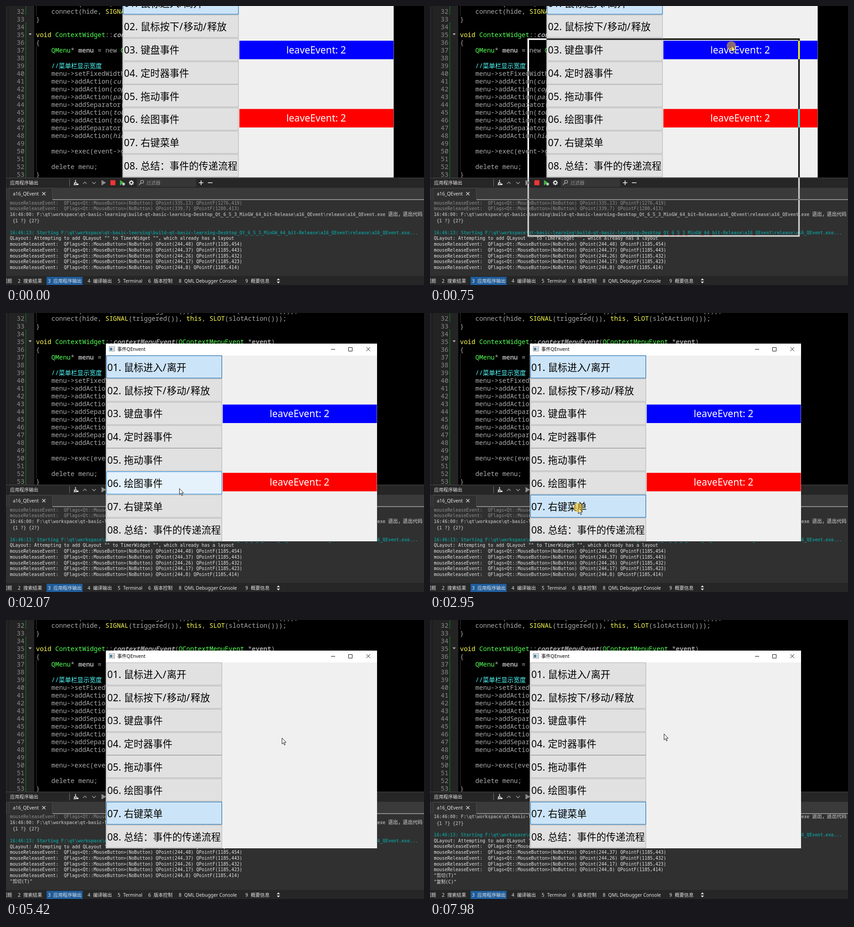
These frames come from a looping animation (917 px wide and 611 px high, 8 s). An HTML page:

```html
<!DOCTYPE html>
<html lang="zh">
<head>
<meta charset="utf-8">
<title>QEvent</title>
<style>
html, body { margin: 0; width: 100%; height: 100%; overflow: hidden; background: #000; }
svg { display: block; width: 917px; height: 611px; isolation: isolate; }
text { white-space: pre; font: 10.3px "Noto Sans", "Noto Sans CJK SC", sans-serif; }
.code text { font: 14.1px "Noto Sans Mono", "Noto Sans CJK SC", monospace; fill: #aaa; }
.code .num { fill: #888; text-anchor: end; }
.k { fill: #ff5; } .t { fill: #5f5; } .c { fill: #5ff; font-size: 13.5px; }
.b { font-weight: bold; } .i { font-style: italic; }
.log text { font: 9.86px "DejaVu Sans Mono", "Noto Sans CJK SC", monospace; fill: #e4e4e4; }
.log .old { fill: #8e8e8e; }
.log .gone { fill: #a2a2a2; font-weight: bold; }
.log .start { fill: #128c8c; font-weight: bold; }
.big { font-size: 21.25px; }
.bar text { fill: #e6e6e6; }
#outline { mix-blend-mode: difference; }
</style>
</head>
<body>
<svg id="stage" viewBox="0 0 917 611" xmlns="http://www.w3.org/2000/svg"></svg>
<script>
const rect = (x, y, w, h, fill, more = '') =>
  `<rect x="${x}" y="${y}" width="${w}" height="${h}" fill="${fill}" ${more}/>`;
const text = (x, y, s, more = '') => `<text x="${x}" y="${y}" ${more}>${s}</text>`;
const line = (d, color, w = 1, more = '') =>
  `<path d="${d}" fill="none" stroke="${color}" stroke-width="${w}" ${more}/>`;
const shape = (d, fill) => `<path d="${d}" fill="${fill}"/>`;
const span = cls => s => `<tspan class="${cls}">${s}</tspan>`;
const key = span('k'), type = span('t'), bold = span('b'), ital = span('i');

// Editor
const connect = name => `connect(${name}, ${key('SIGNAL')}(triggered()), ${key('this')}, ${key('SLOT')}(slotAction()));`;
const add = name => `menu-&gt;addAction(${ital(name)});`;
const codeLines = [
  [31, 4, connect('toLower')],
  [32, 4, connect('hide')],
  [33, 0, '}'],
  [35, 0, `${key('void')} ${type('ContextWidget')}::${span('b i')('contextMenuEvent')}(${type('QContextMenuEvent')} *${bold('event')})`],
  [36, 0, '{'],
  [37, 4, `${type('QMenu')}* ${bold('menu')} = new ${type('QMenu')}(${key('this')});`],
  [39, 4, span('c')('//菜单栏显示宽度')],
  [40, 4, 'menu-&gt;setFixedWidth(160);'],
  [41, 4, add('cut')],
  [42, 4, add('copy')],
  [43, 4, add('paste')],
  [44, 4, 'menu-&gt;addSeparator();'],
  [45, 4, add('toUpper')],
  [46, 4, add('toLower')],
  [47, 4, 'menu-&gt;addSeparator();'],
  [48, 4, add('hide')],
  [50, 4, 'menu-&gt;exec(event-&gt;globalPos());'],
  [52, 4, 'delete menu;'],
  [53, 0, '}']
];
const lineY = n => 17 + (n - 32) * 17;

function editor() {
  let s = rect(0, 0, 917, 377, '#000') + rect(0, 0, 62, 377, '#232323') + rect(0, 0, 4, 377, '#262626')
    + rect(4, 0, 1, 377, '#111') + rect(43, 0, 1, 20, '#0a8a1c') + rect(43, 36, 1, 340, '#0a8a1c')
    + rect(66, 0, 1, 21, '#3c3c3c') + rect(66, 88, 1, 274, '#3c3c3c')
    + shape('M49.5 60h7l-3.5 4z', '#b4b4b4');
  for (let n = 32; n <= 53; n++) s += text(40.5, lineY(n), n, 'class="num"');
  for (const [n, col, src] of codeLines) s += text(65.7 + col * 8.46, lineY(n), src);
  return `<g class="code">${s}</g>`;
}

// Output pane
const point = (p, q) => `mouseReleaseEvent:  QFlags&lt;Qt::MouseButton&gt;(NoButton) QPoint(${p}) QPointF(${q})`;
const exe = 'F:\\qt\\workspace\\qt-basic-learning\\build-qt-basic-learning-Desktop_Qt_6_5_3_MinGW_64_bit-Release\\a16_QEvent\\release\\a16_QEvent.exe';
const logLines = [
  ['old', point('335,13', '1276,419')],
  ['old', point('339,7', '1280,413')],
  ['gone', `16:46:00: ${exe} <tspan font-size="10.8">退出，退出代码</tspan>`, 1.5],
  ['gone', ' {1 ?} {2?}'],
  ['', ''],
  ['start', `16:46:13: Starting ${exe}...`],
  ['', 'QLayout: Attempting to add QLayout "" to TimerWidget "", which already has a layout'],
  ['', point('244,48', '1185,454')],
  ['', point('244,37', '1185,443')],
  ['', point('244,26', '1185,432')],
  ['', point('244,17', '1185,423')],
  ['', point('244,8', '1185,414')],
  ['cut', '"剪切(T)"', 1.5],
  ['copy', '"复制(C)"']
];

function log() {
  let y = 434.6, s = '';
  for (const [cls, src, extra = 0] of logLines) {
    s += text(8.5, y.toFixed(1), src, `class="${cls}"`);
    y += 12.72 + extra;
  }
  return `<g class="log" clip-path="url(#logClip)"><g id="log">${s}</g></g>`;
}

function pane() {
  const gear = Array.from({ length: 8 }, (_, i) =>
    `<rect x="274" y="381.5" width="2" height="3" fill="#e6e6e6" transform="rotate(${i * 45} 275 387)"/>`).join('');
  const tools = text(9, 390.8, '应用程序输出') + rect(139, 379, 1, 16, '#777')
    + line('M152.5 381v6M149 387.5h7M148 391.5h5l-4-4', '#e6e6e6', 1.6) + rect(154, 389, 5, 3, '#e6e6e6')
    + line('M169 389.5l4-4l4 4M189 385.5l4 4l4-4', '#9a9a9a', 1.3)
    + shape('M209.5 381v12l10-6z', '#8e8e8e') + rect(229, 381.5, 11, 11, '#f03434')
    + shape('M250 381v12l9-6z', '#3fb53f') + '<circle cx="258" cy="390" r="3" fill="#b9c4cc"/>'
    + gear + '<circle cx="275" cy="387" r="3" fill="none" stroke="#e6e6e6" stroke-width="1.8"/>'
    + rect(287, 378, 130, 18, '#363636')
    + '<circle cx="298.5" cy="385" r="3.2" fill="none" stroke="#b4b4b4" stroke-width="1.3"/>'
    + line('M296 387.5l-4 4', '#b4b4b4', 1.6) + text(308, 390.8, '过滤器', 'style="fill:#8f8f8f"')
    + line('M423 387h10M428 382v10M443 387h10', '#f2f2f2', 1.6);
  const tabs = [[26, 2, '搜索结果'], [92, 3, '应用程序输出'], [179, 4, '编译输出'], [245, 5, 'Terminal'],
    [312, 6, '版本控制'], [379, 8, 'QML Debugger Console'], [525, 9, '概要信息']];
  return `<g class="bar">` + rect(0, 376, 917, 235, '#303030') + rect(0, 376, 917, 1, '#4a4a4a')
    + rect(0, 377, 917, 21, '#262626') + rect(0, 398, 917, 26, '#3a3a3a')
    + rect(6, 399, 96, 26, '#303030') + line('M6.5 424v-25h95v25', '#4a4a4a')
    + rect(102, 423.5, 815, 1, '#e0e0e0') + rect(4, 377, 1, 47, '#161616')
    + tools + text(15, 414.8, 'a16_QEvent') + line('M79.5 407.5l7 7m0-7l-7 7', '#e6e6e6', 1.2)
    + rect(0, 591, 917, 20, '#262626') + rect(89, 593, 79, 18, '#1f5c9a')
    + text(-7.3, 606, '问题')
    + tabs.map(([x, n, s]) => text(x, 606, n) + text(x + 12, 606, s)).join('')
    + shape('M594 600.5h7l-3.5-4zM594 603.5h7l-3.5 4z', '#e6e6e6') + '</g>' + log();
}

// Application window
const names = ['鼠标进入/离开', '鼠标按下/移动/释放', '键盘事件', '定时器事件', '拖动事件', '绘图事件', '右键菜单', '总结：事件的传递流程'];
const rowTop = i => Math.round(93 + i * 50.86);

function appWindow() {
  const rows = names.map((s, i) => {
    const label = `<tspan letter-spacing=".25">0${i + 1}. </tspan>` + s.replace(/\//g, '<tspan letter-spacing="1.4">/</tspan>');
    return rect(220.5, rowTop(i) + .5, 253, 49, '#e1e1e1', 'class="row"')
      + text(222.2, (126.6 + i * 50.86).toFixed(1), label, 'class="big"');
  }).join('');
  const banner = (y, fill) => rect(475.5, y, 338, 40.5, fill)
    + text(644, y + 27.6, 'leaveEvent: 2', 'class="big" fill="#fff" text-anchor="middle"');
  return `<g id="win">` + rect(219, 67, 595, 433, '#f0f0f0') + rect(219, 67, 595, 26, '#fff')
    + rect(226.5, 73.5, 12, 10, '#f4f4f4', 'stroke="#8b9299"') + rect(228, 76, 5, 6, '#3f7f9f') + rect(234, 76, 3, 6, '#c3c9cd')
    + text(244, 83.4, '事件QEnvent')
    + line('M713 79.5h9M751.5 75.5h8v8h-8zM790.5 75l8.5 8.5m0-8.5l-8.5 8.5', '#111')
    + rows + `<g id="page">${banner(200.5, '#00f')}${banner(350, '#f00')}</g></g>`;
}

// Context menu, relative to its own corner
const items = [[11.5, '剪切(T)'], [30.2, '复制(C)'], [49, '粘贴(P)'], [75, '转成大写(U)'], [94, '转成小写(L)'], [120, '隐藏行']];

function contextMenu() {
  return `<g id="menu">` + rect(3, 3, 134, 131, '#5a5a68', 'opacity=".55"') + rect(2, 2, 134, 131, '#5a5a68', 'opacity=".45"')
    + rect(.5, .5, 134, 131, '#f0f0f0', 'stroke="#b8b8cc"')
    + rect(2.5, 0, 130, 19, '#91c9f7', 'id="lit"')
    + rect(26, 61, 106, 1, '#d0d0d0') + rect(26, 106, 106, 1, '#d0d0d0')
    + items.map(([y, s]) => text(29, y + 4, s)).join('') + '</g>';
}

document.getElementById('stage').innerHTML =
  '<clipPath id="logClip"><rect x="0" y="425.5" width="917" height="165"/></clipPath>'
  + editor() + pane() + appWindow() + contextMenu()
  + '<rect id="outline" width="594" height="431" fill="none" stroke="#fff" stroke-width="3.4"/>'
  + '<path id="cursor" d="M.5 .5v13l3-2.8l2.2 5.1l2-.9l-2.2-4.9h4z" fill="#fff" stroke="#000" stroke-width=".9"/>'
  + '<circle id="press" r="10.3" fill="#f8c010" opacity=".55"/>';

const el = id => document.getElementById(id);
const rowBoxes = document.querySelectorAll('.row');
const place = (id, x, y) => el(id).setAttribute('transform', `translate(${x} ${y})`);
const show = (id, on) => el(id).style.display = on ? '' : 'none';
const within = (t, spans) => spans.some(([a, b]) => t >= a && t < b);

const LOOP = 8000, TICK = 67;
const GRIP = [666, 82], DROP = 1160, SWITCH = 3050;
const track = [
  [130, 703, -43], [400, 668, 58], [530, 646, 100], [670, 655, 93], [740, 661, 87], [890, 661, 87],
  [950, 656, 94], [1030, 663, 85], [1150, 666, 82], [1300, 666, 82], [1560, 540, 235], [1730, 448, 312],
  [2060, 380, 384], [2270, 380, 384], [2600, 342, 412], [2860, 325, 426], [3100, 325, 426], [3350, 440, 345],
  [3600, 560, 262], [3730, 583, 250], [3860, 572, 247], [4540, 572, 247], [4800, 605, 258],
  [6130, 605, 258], [6480, 641, 285], [7510, 641, 285], [7830, 513, 249]
];
const presses = [[0, DROP], [2880, SWITCH], [4000, 4190], [5290, 5420], [5950, 6130], [6970, 7170], [7840, 7975]];
const menus = [[4150, 5420, 572, 247], [6110, 7170, 606, 258]];

function cursorAt(t) {
  const n = track.findIndex(k => k[0] > t);
  if (n < 0) return track[track.length - 1].slice(1);
  if (n === 0) return track[0].slice(1);
  const [t0, x0, y0] = track[n - 1], [t1, x1, y1] = track[n];
  const u = Math.floor((t - t0) / TICK) * TICK / (t1 - t0);
  return [Math.round(x0 + (x1 - x0) * u), Math.round(y0 + (y1 - y0) * u)];
}

function draw(t) {
  const [x, y] = cursorAt(t);
  const menu = menus.find(m => t >= m[0] && t < m[1]);
  const dropped = t >= DROP, switched = t >= SWITCH;

  place('cursor', x, y);
  show('cursor', t >= 200);
  place('press', x, y);
  show('press', t >= 200 && within(t, presses));

  show('outline', t >= 200 && !dropped);
  place('outline', 220.5 + x - GRIP[0], 67.6 + y - GRIP[1]);
  place('win', dropped ? 0 : 36.5, dropped ? 0 : -124.5);
  show('page', !switched);

  rowBoxes.forEach((box, i) => {
    const top = rowTop(i);
    const hover = dropped && !menu && x >= 220 && x < 474 && y >= top && y < top + 50;
    const checked = i === (switched ? 6 : 0) || (i === 6 && within(t, [[2880, SWITCH]]));
    box.setAttribute('fill', checked ? '#cce4f7' : hover ? '#e5f1fb' : '#e1e1e1');
    box.setAttribute('stroke', checked ? '#005499' : hover ? '#0078d7' : '#adadad');
  });

  show('menu', menu);
  if (menu) {
    const [, , mx, my] = menu;
    place('menu', mx, my);
    const item = items.find(([c]) => x > mx + 1 && Math.abs(y - my - c) < 9.5);
    show('lit', item);
    if (item) el('lit').setAttribute('y', item[0] - 9.5);
  }

  const added = (t >= 5420) + (t >= 7170);
  place('log', 0, -12.8 * added);
  document.querySelector('.cut').style.display = added > 0 ? '' : 'none';
  document.querySelector('.copy').style.display = added > 1 ? '' : 'none';
}

const began = performance.now();
function frame() {
  draw((performance.now() - began) % LOOP);
  requestAnimationFrame(frame);
}
frame();
</script>
</body>
</html>
```
